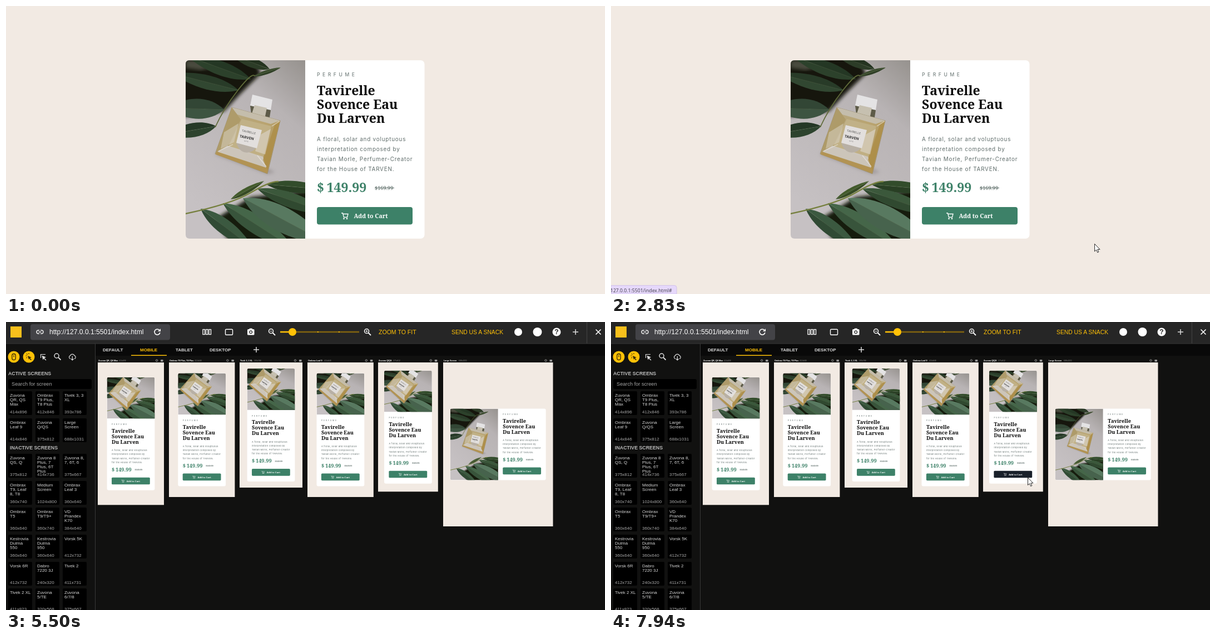
Recreate the animation shown at these times as an HTML page. Size 1077 px wide and 520 px high, loop 8000 ms.

```html
<!DOCTYPE html>
<html lang="en">
<head>
<meta charset="utf-8">
<title>Product card preview</title>
<style>
  html, body { margin: 0; width: 100%; height: 100%; overflow: hidden; background: #f2eae3; }
  svg { display: block; }
  text { font-family: "Liberation Sans", Arial, sans-serif; white-space: pre; }
  .serif { font-family: "Noto Serif", serif; font-weight: 700; }
  .sans { font-family: Inter, sans-serif; font-weight: 400; }
  .status { font-family: "Noto Sans", sans-serif; }
  .bold { font-weight: 700; }
</style>
</head>
<body>
<svg id="stage" width="1077" height="520" viewBox="0 0 1077 520"></svg>
<script>
const GREEN = '#3d8168', DARK = '#19202a', YELLOW = '#ffc107', GREY = '#5f6c6a';

const text = (x, y, str, size, fill, cls = '', more = '') =>
  `<text x="${x}" y="${y}" font-size="${size}" fill="${fill}" class="${cls}" ${more}>${str}</text>`;
const rect = (x, y, w, h, fill, r = 0, more = '') =>
  `<rect x="${x}" y="${y}" width="${w}" height="${h}" rx="${r}" fill="${fill}" ${more}/>`;
const circle = (x, y, r, fill, more = '') => `<circle cx="${x}" cy="${y}" r="${r}" fill="${fill}" ${more}/>`;
const line = (d, color, w = 1.5, more = '') =>
  `<path d="${d}" fill="none" stroke="${color}" stroke-width="${w}" ${more}/>`;
const shape = (points, fill, more = '') => `<polygon points="${points}" fill="${fill}" ${more}/>`;
const use = (id, transform = '', more = '') => `<use href="#${id}" transform="${transform}" ${more}/>`;

// A full leaf from its base to its tip, with one half in shade.
function leaf(x1, y1, x2, y2, width, fill) {
  const len = Math.hypot(x2 - x1, y2 - y1);
  const at = (k, side) => `${x1 + (x2 - x1) * k - (y2 - y1) / len * width * side} ` +
    `${y1 + (y2 - y1) * k + (x2 - x1) / len * width * side}`;
  const half = side => `<path d="M${x1} ${y1}C${at(.25, side)} ${at(.65, side)} ${x2} ${y2}Z" fill="${fill}"/>`;
  return half(-1) + half(1) + half(1).replace(fill, '#0b140a').replace('/>', ' opacity=".22"/>') +
    line(`M${x1} ${y1}L${x2} ${y2}`, '#8fa27c', .6, 'opacity=".35"');
}

const topLeaves = `
  <path d="M318 93H445L458 122 420 160 392 190 318 200Z" fill="#14170d" filter="url(#soft)"/>
  <path d="M323 98H360L374 110 350 116 323 112Z" fill="#6d6f60" opacity=".6" filter="url(#soft)"/>` +
  leaf(474, 114, 405, 88, 12, '#2c3c27') +
  leaf(440, 132, 325, 90, 17, '#2c412b') +
  leaf(418, 152, 300, 122, 17, '#314731') +
  leaf(392, 187, 290, 184, 24, '#3d5441') +
  leaf(378, 217, 290, 232, 17, '#2d432e') +
  line('M376 219Q392 184 417 152T447 126L492 112', '#5f6a39', 1.8) +
  leaf(446, 127, 494, 111, 5, '#3a4b2e');

const bottomLeaves = `
  <path d="M440 345L565 330V430H405L375 385Z" fill="#171f11" filter="url(#soft)"/>` +
  leaf(468, 322, 580, 332, 14, '#324c2b') +
  leaf(452, 330, 585, 376, 18, '#3b583b') +
  leaf(350, 366, 445, 438, 18, '#3b5940') +
  leaf(390, 356, 520, 440, 22, '#456649') +
  leaf(426, 347, 580, 430, 30, '#587960') +
  leaf(404, 349, 464, 316, 7, '#435b2c') +
  line('M318 376Q405 358 440 337T490 317', '#76803f', 2.4);

const bottle =
  shape('376,268 470,303 484,300 387,258', '#7d7676', 'opacity=".5" filter="url(#soft)"') +
  shape('443,160 479,169 476,188 439,180', '#e4e3e4') +
  shape('439,180 476,188 474,201 441,195', '#5d5b48') +
  shape('447,179 469,184 465,204 441,197', '#c6c0b0') +
  shape('406,183 493,207 470,303 376,267', 'url(#gold)', 'stroke="#9d906f" stroke-width=".8"') +
  shape('406,183 493,207 476,213 416,196', '#c9c3b8', 'opacity=".8"') +
  shape('406,183 422,205 398,256 376,267', '#ab9763', 'opacity=".75"') +
  shape('424,204 477,217 462,276 400,254', '#c4b48b', 'opacity=".8"') +
  shape('398,252 462,272 468,292 380,263', '#cfc9c3', 'opacity=".9"') +
  shape('379,263 469,293 470,302 377,268', '#b29353') +
  shape('493,207 484,212 462,278 470,296', '#ad8c45', 'opacity=".75"') +
  shape('392,228 418,212 410,246 386,258', '#d8d0c2', 'opacity=".55"') +
  shape('458,232 476,222 466,268 448,262', '#dcd6cc', 'opacity=".6"') +
  line('M382 262L408 250M452 270L468 290M478 217L492 208', '#ebe7e0', 1.3, 'opacity=".7"') +
  '<path d="M414 247Q421 268 438 264 448 261 449 255Z" fill="#b8b0a5"/>' +
  shape('422,215 460,224 451,257 414,247', '#e2dfdd') +
  '<g transform="rotate(12 421 225)">' +
  text(424, 226, 'TAVIRELLE', 5, '#555', 'sans') +
  text(422, 237, 'TARVEN', 6.4, '#333', 'sans bold') +
  text(432, 242.5, 'NOTE', 2.8, '#777', 'sans') + '</g>';

const info =
  text(559, 127, 'PERFUME', 8.6, GREY, 'sans', 'letter-spacing="4.55"') +
  ['Tavirelle', 'Sovence Eau', 'Du Larven'].map((s, i) => text(559, 161 + 25 * i, s, 23, '#0a0a0a', 'serif')).join('') +
  ['A floral, solar and voluptuous', 'interpretation composed by', 'Tavian Morle, Perfumer-Creator', 'for the House of TARVEN.']
    .map((s, i) => text(559, 244.2 + 17.9 * i, s, 9.9, GREY, 'sans', 'letter-spacing=".8"')).join('') +
  text(559, 336, '$', 23, GREEN, 'serif') + text(576.5, 336, '149.99', 23.2, GREEN, 'serif') +
  text(663, 332, '$169.99', 9.2, '#53645f', 'serif', 'style="font-weight:400"') +
  line('M663 328.5H698', '#53645f', .9) +
  rect(559, 363, 172, 31.5, 'currentColor', 4) +
  line('M603 374H605.5L607.5 381.5H613.5L615 375.5H606', '#fff', 1.3) +
  circle(607.5, 384, 1.3, '#fff') + circle(613, 384, 1.3, '#fff') +
  text(625.5, 383.3, 'Add to Cart', 10.6, '#fff', 'serif');

const defs = `<defs>
  <filter id="soft"><feGaussianBlur stdDeviation="3"/></filter>
  <linearGradient id="wall" x1="1" y1="0" x2=".4" y2="1">
    <stop stop-color="#96928e"/><stop offset=".3" stop-color="#b8b3b4"/><stop offset="1" stop-color="#c6c1c3"/>
  </linearGradient>
  <linearGradient id="gold" x1="0" y1="0" x2="1" y2="1">
    <stop stop-color="#b5a98a"/><stop offset=".5" stop-color="#b9a470"/><stop offset="1" stop-color="#ab8c4c"/>
  </linearGradient>
  <clipPath id="wideClip"><path d="M538 98V420H330Q323 420 323 413V105Q323 98 330 98Z"/></clipPath>
  <clipPath id="tallClip"><path d="M0 74.7V3Q0 0 3 0H82.8Q85.8 0 85.8 3V74.7Z"/></clipPath>
  <g id="topLeaves">${topLeaves}</g><g id="bottomLeaves">${bottomLeaves}</g>
  <g id="bottle">${bottle}</g><g id="info">${info}</g>
  <g id="wide">
    ${rect(323, 98, 429.5, 322, '#fff', 7)}
    <g clip-path="url(#wideClip)">
      ${rect(323, 98, 215, 322, 'url(#wall)')}${use('topLeaves')}${use('bottomLeaves')}${use('bottle')}
    </g>${use('info')}
  </g>
  <g id="tall">
    ${rect(0, 0, 85.8, 204, '#fff', 3)}
    <g clip-path="url(#tallClip)">
      ${rect(0, 0, 85.8, 75, 'url(#wall)')}
      ${use('topLeaves', 'translate(0 -4) scale(.4 .3) translate(-323 -98)')}
      ${use('bottomLeaves', 'translate(0 61) scale(.4) translate(-323 -375)')}
      ${use('bottle', 'translate(32 28) rotate(22) scale(.44) translate(-436 -240)')}
    </g>${use('info', 'translate(8.4 85.5) scale(.4) translate(-559 -124)')}
  </g>
</defs>`;

const page = `<g id="page">${rect(0, 0, 1077, 520, '#f2eae3')}${use('wide', '', 'id="mainCard"')}
  <g id="status"><path d="M0 504.5H114Q118 504.5 118 508.5V520H0Z" fill="#e6d8fb" stroke="#d2c3e8"/>
  ${text(-1, 516.5, '127.0.0.1:5501/index.html#', 8.65, '#4a4553', 'status')}</g></g>`;

// Sidebar cards: first baseline, then three "name lines|size" entries.
const shelf = [
  [135, 'Zuvona/QR, QS/Max|414x896', 'Ombrax/T9 Plus,/T8 Plus|412x846', 'Tivek 3, 3/XL|393x786'],
  [184, 'Ombrax/Leaf 9|414x846', 'Zuvona/Q~QS|375x812', 'Large/Screen|688x1031'],
  [248, 'Zuvona/QS, Q|375x812', 'Zuvona 8/Plus, 7/Plus, 6T/Plus|414x736', 'Zuvona 8,/7, 6T, 6|375x667'],
  [297, 'Ombrax/T9, Leaf/8, T8|360x740', 'Medium/Screen|1024x800', 'Ombrax/Leaf 3|360x640'],
  [345, 'Ombrax/T5|360x640', 'Ombrax/T9~T9+|360x740', 'VD/Prandex/K70|384x640'],
  [394, 'Kestrovia/Dulma/550|360x640', 'Kestrovia/Dulma/950|360x640', 'Vorsk 5K|412x732'],
  [443, 'Vorsk 6R|412x732', 'Dabro/7220 3J|240x320', 'Tivek 2|411x731'],
  [491, 'Tivek 2 XL|411x823', 'Zuvona/5~TE|320x568', 'Zuvona/6~7~8|375x667'],
];
const sidebar = shelf.map(([y, ...cards]) => cards.map((card, i) => {
  const [name, size] = card.split('|'), x = 4 + 49 * i;
  return rect(x, y - 10, 43, 43, '#000', 2) +
    name.split('/').map((s, n) => text(x + 3, y + 8 * n, s.replace(/~/g, '/'), 8, '#d6d6d6')).join('') +
    text(x + 3, y + 30, size, 8, '#a9a9a9');
}).join('')).join('');

const lens = (x, y, color = '#fff') => circle(x - 1.5, y - 1.5, 4, 'none', `stroke="${color}" stroke-width="1.5"`) +
  line(`M${x + 1.5} ${y + 1.5}l4.5 4.5`, color, 1.8);
const plus = (x, y, r) => line(`M${x - r} ${y}h${2 * r}M${x} ${y - r}v${2 * r}`, '#ddd', 1.5);

const header = rect(0, 0, 1077, 39, '#262626') + rect(8, 8, 20, 20, '#f8c01c') +
  rect(44, 4, 251, 28.5, '#434347', 4) +
  line('M60 15H58a3 3 0 0 0 0 6h2M62 15h2a3 3 0 0 1 0 6h-2M58.5 18h5', '#eee', 1.4) +
  text(78, 22.3, 'http://127.0.0.1:5501/index.html', 12.1, '#fff') +
  line('M276 15a5 5 0 1 0 .9 4', '#fff', 1.6) + '<path d="M278 12V17H273Z" fill="#fff"/>' +
  [354, 359.5, 365].map(x => rect(x, 13.5, 3.5, 9, 'none', 0, 'stroke="#fff" stroke-width="1.3"')).join('') +
  rect(394.5, 13.3, 13, 10, 'none', 1.5, 'stroke="#fff" stroke-width="1.4"') +
  rect(434, 13, 12.5, 10.5, '#fff', 1.5) + rect(437.5, 11.5, 5.5, 3, '#fff', 1) +
  circle(440.2, 18.2, 3, '#262626') + circle(440.2, 18.2, 1.7, '#fff') +
  lens(478, 18) + line('M474.5 16.5h4', '#fff', 1) +
  line('M493 18H635', '#82640f', 2.4) + line('M493 18H515', YELLOW, 2.4) +
  line('M560 18h1.6M598 18h1.6', YELLOW, 2) + circle(515, 18, 7, YELLOW) +
  lens(650, 18) + line('M646.5 16.5h4M648.5 14.5v4', '#fff', 1) +
  text(670, 21.7, 'ZOOM TO FIT', 10.55, YELLOW) + text(801, 21.7, 'SEND US A SNACK', 10.35, YELLOW) +
  circle(921, 18, 7, '#fff') + circle(955.5, 18, 8, '#fff') + circle(990, 18, 7.5, '#fff') +
  text(990, 22.3, '?', 12, '#262626', 'bold', 'text-anchor="middle"') +
  plus(1024, 18, 5) + line('M1044.5 0V39', '#444', 1) + line('M1060.5 13.5l9 9m0-9l-9 9', '#fff', 1.6);

const tools = circle(14, 63, 10.5, YELLOW) + circle(41, 63, 10.5, YELLOW) +
  rect(10.8, 57.5, 6.5, 11, 'none', 3.2, 'stroke="#332a08" stroke-width="1.3"') + line('M14 60v3', '#332a08', 1.2) +
  '<path d="M39 61L46 64 43 65 46 68 44.5 69 42 66 41 68Z" fill="#332a08"/>' +
  line('M37 57l1.5 2M41 56v2M35.5 61h2M36.5 65l1.5-1', '#332a08', 1.1) +
  '<path d="M64.5 60.5L72 63.5 69 65 72.5 68.5 71.5 69.5 68 66 66.5 68.5Z" fill="#ddd"/>' +
  line('M62.5 65V58.5H71', '#ddd', 1.2) + lens(92.5, 62.5, '#ddd') +
  line('M116 66.5a3 3 0 0 1-.5-5.8a4 4 0 0 1 7.5 0a3 3 0 0 1 0 5.8M119.3 61.5v7M117 66.5l2.3 2.3 2.3-2.3', '#ddd', 1.2);

const tabs = rect(161, 39, 916, 22, '#090909') + [[174, 'DEFAULT'], [241, 'MOBILE'], [305, 'TABLET'], [366, 'DESKTOP']]
  .map(([x, s]) => text(x, 53, s, 8, s === 'MOBILE' ? YELLOW : '#d8d8d8', 'bold')).join('') +
  rect(225, 59.5, 64, 1.5, YELLOW) + plus(450, 50, 5);

// Preview screens: left edge, width, height, label, start of the size label.
const screens = [
  [165, 119, 257.3, 'Zuvona QR, QS Max', 203, '414x896'],
  [293, 118.4, 243, 'Ombrax T9 Plus, T8 Plus', 339, '412x846'],
  [420, 113, 226, 'Tivek 3, 3 XL', 446, '393x786'],
  [542, 118.8, 243, 'Ombrax Leaf 9', 572, '414x846'],
  [669, 107.8, 233.3, 'Zuvona Q/QS', 696, '375x812'],
  [786, 197.5, 296, 'Large Screen', 814, '688x1031'],
].map(([x, w, h, label, sizeX, size], i) => {
  const cx = x + w / 2, cy = 73 + h / 2, right = x + w;
  const card = i < 5 ? use('tall', `translate(${cx - 42.9} ${cy - 102})`, `id="card${i}"`)
    : use('wide', `translate(${cx} ${cy}) scale(.4) translate(-537.75 -259)`, `id="card${i}"`);
  return rect(x, 73, w, h, '#f2eae3') + card + text(x + 1, 71, label, 3.7, '#fff', 'bold') +
    text(sizeX, 71, size, 3.4, '#888') +
    circle(right - 13, 69.5, 1.7, 'none', 'stroke="#999"') + rect(right - 6, 68, 4.5, 3.5, '#999', .6);
}).join('');

const app = `<g id="app">${rect(0, 0, 1077, 520, '#111110')}${header}${tabs}
  ${line('M0 39H1077', '#383838', 1)}${line('M160.5 39V520', '#383838', 1)}${tools}
  ${text(4, 96, 'ACTIVE SCREENS', 8.8, '#b9b9b9', 'bold')}
  ${rect(4, 103, 150, 18, '#000', 3)}${text(10, 115, 'Search for screen', 9.2, '#a5a5a5')}
  ${text(7, 230, 'INACTIVE SCREENS', 8.8, '#b9b9b9', 'bold')}${sidebar}${screens}</g>`;

const $ = id => document.getElementById(id);
$('stage').innerHTML = defs + page + app +
  '<path id="cursor" d="M.5 .5V14L3.6 11.2 5.7 16 7.8 15 5.8 10.4H10Z" fill="#fff" stroke="#111" stroke-width=".9"/>';

// Pointer path: time, x, y
const path = [
  [320, 974, 499], [470, 860, 425], [640, 742, 358], [920, 607, 354], [1070, 607, 354],
  [1250, 612, 370], [1820, 636, 378], [1960, 638, 380], [2360, 638, 381], [2550, 640, 381],
  [2830, 869, 429], [3270, 903, 448], [3410, 905, 450], [3830, 984, 498], [4090, 986, 500], [4230, 1004, 520],
  [5500, 1014, 520], [5960, 937, 316], [6220, 937, 316], [6450, 930, 276], [6980, 920, 269], [7050, 919, 268],
  [7400, 865, 282], [7800, 752, 283], [7870, 750.5, 280.8], [7940, 749, 280.5],
];
function pointer(t) {
  const i = path.findIndex(p => p[0] > t);
  if (i < 1) return path[i < 0 ? path.length - 1 : 0].slice(1);
  const [t0, x0, y0] = path[i - 1], [t1, x1, y1] = path[i], k = (t - t0) / (t1 - t0);
  return [x0 + (x1 - x0) * k, y0 + (y1 - y0) * k];
}

const show = (id, on) => $(id).style.display = on ? '' : 'none';
function frame(now) {
  const t = now % 8000, inApp = t >= 5500, [x, y] = pointer(t);
  const visible = t >= 320 && t < 4230 || t >= 5570;
  const paint = (id, active, left, top, w, h) => $(id).style.color =
    active && visible && x >= left && x <= left + w && y >= top && y <= top + h ? DARK : GREEN;
  show('page', !inApp);
  show('app', inApp);
  show('status', t >= 1960 && t < 3200);
  show('cursor', visible);
  $('cursor').setAttribute('transform', `translate(${x} ${y})`);
  paint('mainCard', !inApp, 559, 363, 172, 31.5);
  for (let i = 0; i < 4; i++) $('card' + i).style.color = GREEN;
  paint('card4', inApp, 688.4, 268.8, 68.8, 12.5);
  paint('card5', inApp, 893, 262, 69, 13);
  requestAnimationFrame(() => frame(performance.now()));
}
frame(performance.now());
</script>
</body>
</html>
```
